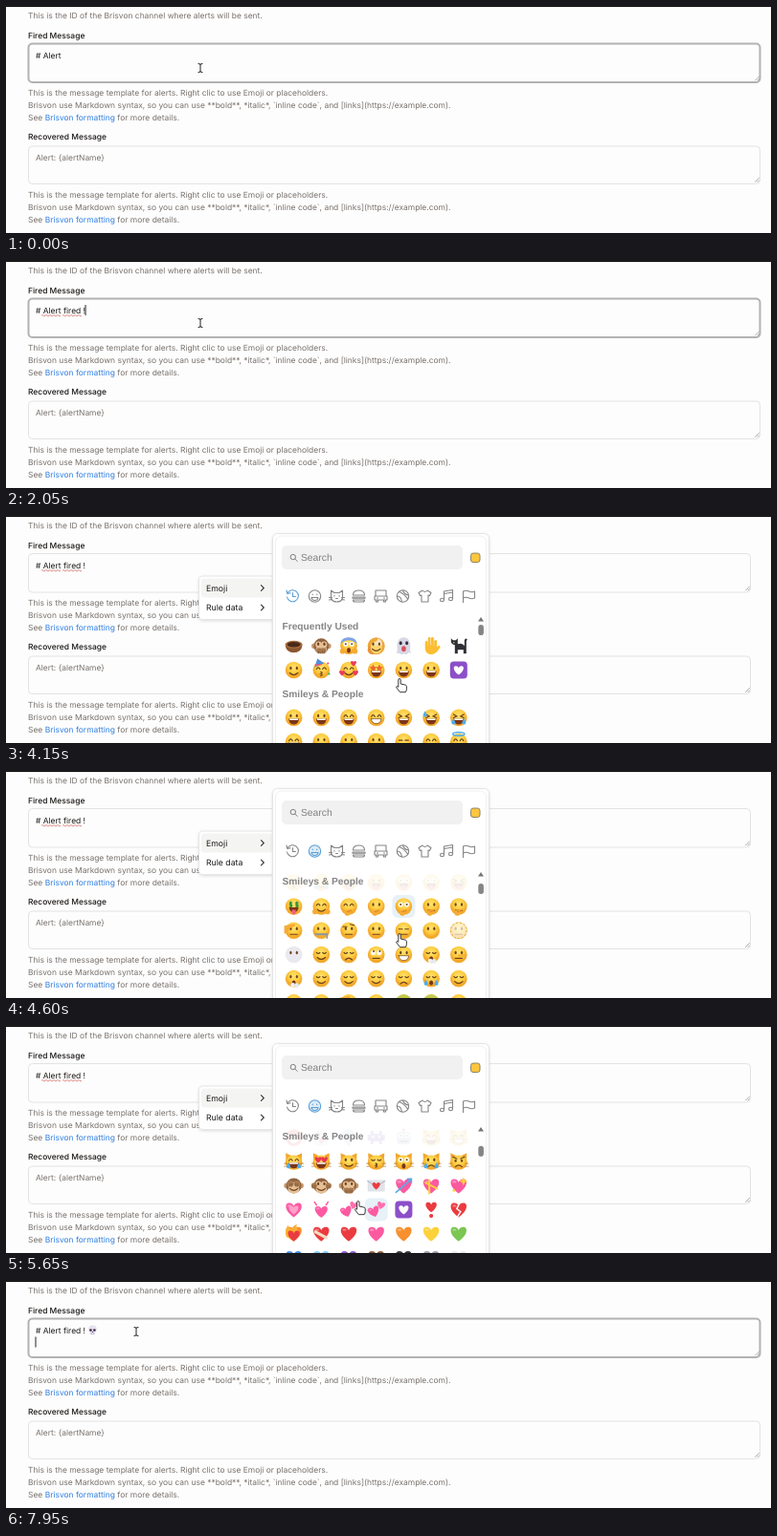
Write an HTML page that moves like this. It is 799 px wide and 238 px high and loops after 8000 ms.

```html
<!DOCTYPE html>
<html lang="en">
<head>
<meta charset="utf-8">
<title>Alert message form</title>
<style>
html, body { margin: 0; width: 100%; height: 100%; overflow: hidden; background: #fdfdfd; }
svg { display: block; width: 799px; height: 238px; }
text { font: 8.45px Inter, sans-serif; white-space: pre; text-rendering: geometricPrecision; }
.help { fill: #78716c; }
.label { font-weight: 500; fill: #1c1917; }
.field, .menu { fill: #1c1917; }
.menu { font-size: 8.7px; }
.link { fill: #2f7fe0; }
.search { font: 10.3px "Liberation Sans", sans-serif; fill: #808083; }
.heading { font: bold 10.2px "Liberation Sans", sans-serif; fill: #858587; }
.icon { fill: none; stroke: #858585; stroke-width: 1.1; stroke-linejoin: round; stroke-linecap: round; }
.icon.active { stroke: #5b9fd8; fill: #dcebf7; }
</style>
</head>
<body>
<svg id="stage" viewBox="0 0 799 238"></svg>
<script>
const LOOP = 8000;
const MENU_OPEN = 2700, PICKER_OPEN = 3080, PICK = 6350, MENU_CLOSE = 7050, ENTER = 7500;
const KEYS = [[300, ' '], [600, 'f'], [750, 'i'], [900, 'r'], [1050, 'e'], [1200, 'd'], [1500, ' '], [1850, '!']];
const POINTER = [[0, 203, 65], [2760, 203, 65], [3050, 228, 71], [3380, 228, 71], [3950, 411, 171], [5000, 411, 171],
  [5480, 395, 184], [5720, 361, 184], [6000, 356, 153], [6600, 356, 153], [7250, 136, 53]];
const SCROLL = [[4074, 0], [5400, 502.5], [5750, 502.5], [6050, 436]];
const COLUMN = 28.7, ROW = 25.2, FIRST_X = 300.6, FIRST_Y = 216.3;

const text = (x, y, cls, content) => `<text x="${x}" y="${y}" class="${cls}">${content}</text>`;
const rect = (x, y, w, h, r, attrs) => `<rect x="${x}" y="${y}" width="${w}" height="${h}" rx="${r}" ${attrs}/>`;
const circle = (x, y, r, fill, ry = r) => `<ellipse cx="${x}" cy="${y}" rx="${r}" ry="${ry}" fill="${fill}"/>`;
const fill = (d, color) => `<path d="${d}" fill="${color}"/>`;
const line = (d, color = '#6b431c', width = 1.2) =>
  `<path d="${d}" fill="none" stroke="${color}" stroke-width="${width}" stroke-linecap="round"/>`;
const at = (x, y, content, scale = 1, turn = 0) =>
  `<g transform="translate(${x} ${y}) rotate(${turn}) scale(${scale})">${content}</g>`;
const pair = draw => draw(-3.2) + draw(3.2);

// Emoji parts, drawn around 0,0 with a radius of 9
const HEART = 'M0 8C-10 1-10-7-4.6-7Q-1-7 0-3.5Q1-7 4.6-7C10-7 10 1 0 8z';
const COLORS = { P: '#fb5aa0', R: '#ea3c40', O: '#f7902f', Y: '#fdd13a', G: '#7cc653', B: '#438fe6', C: '#80cbf3',
  V: '#8b57c9', N: '#8c5b3d', K: '#35353a', S: '#9b9ba7', W: '#e9e9ef', E: '#c6c84c' };
const BROWN = '#6b431c', HAND = '#f6ab35';
const drop = (x, y) => fill(`M${x} ${y}q-4 6 0 6t0-6z`, '#49aef0');

const EYES = {
  o: pair(x => circle(x, -2, 1.1, BROWN, 1.7)),
  '^': line('M-5-1q1.8-3.4 3.6 0M1.4-1q1.8-3.4 3.6 0'),
  '-': line('M-5-2q1.8 2 3.6 0M1.4-2q1.8 2 3.6 0'),
  _: line('M-5-1.5h3.6M1.4-1.5h3.6'),
  x: line('M-5.4-3.5l3.4 2-3.4 1.6M5.4-3.5l-3.4 2 3.4 1.6'),
  w: pair(x => circle(x, -2, 2.5, '#fff') + circle(x, -2, 1, BROWN)),
  r: pair(x => circle(x, -2, 2.5, '#fff') + circle(x + .5, -3.4, 1, BROWN)),
  h: pair(x => at(x, -2, fill(HEART, '#e93750'), .42)),
  s: pair(x => fill(`M${x}-6l1.2 2.6 2.6.3-2 1.8.6 2.6-2.4-1.3-2.4 1.3.6-2.6-2-1.8 2.6-.3z`, '#e8682c')),
  b: pair(x => circle(x, -1, 1.1, BROWN, 1.5)) + line('M-6-5l4 2M6-5l-4 2'),
  g: fill('M-8-4h16q0 5-4 5t-4-4q0 4-4 4t-4-5z', '#2b2b2e'),
  $: pair(x => line(`M${x + 1.3}-4h-2.2v2h2v2h-2.2M${x}-5v6`, '#2f8f3d'))
};
const MOUTHS = {
  D: fill('M-5.5 1h11q-.6 6-5.5 6t-5.5-6z', '#7b3518') + fill('M-4.8 1h9.6l-.6 1.6h-8.4z', '#fff'),
  T: fill('M-5.2 1.2h10.4q-.4 5-5.2 5t-5.2-5z', '#fff') + line('M-5.2 1.2h10.4q-.4 5-5.2 5t-5.2-5z', BROWN, .7),
  P: fill('M-5 1h10q-.6 5-5 5t-5-5z', '#7b3518') + fill('M-2 3.5h4v4q-2 2-4 0z', '#f2607c'),
  ')': line('M-4.2 3q4.2 4 8.4 0'),
  '(': line('M-3.5 5.5q3.5-3.6 7 0'),
  '-': line('M-3.5 4h7'),
  '~': line('M-4 4q2-2.4 4 0t4 0'),
  O: circle(0, 4.5, 2, '#7b3518', 2.7),
  '*': line('M-.6 2q3 .6 0 2 3 .8 0 2'),
  n: ''
};
const EXTRAS = {
  t: drop(-5.5, 1) + drop(5.5, 1),
  w: drop(-6.5, -7),
  a: `<ellipse cy="-8" rx="6" ry="1.8" fill="none" stroke="#49aef0" stroke-width="1.6"/>`,
  r: [[-7, 3], [7, 3], [5, -7]].map(([x, y]) => at(x, y, fill(HEART, '#ec3a5b'), .36)).join(''),
  k: at(5, 5, fill(HEART, '#e93750'), .38),
  h: fill('M-4 9q-1-5 1-5l6-1.5q1.500 1-1 2.500q0 4-3 5z', HAND) + line('M-1.5 5.5l4-1', '#c9741f', .7),
  H: circle(-6.5, 5.5, 2.8, HAND) + circle(6.5, 5.5, 2.8, HAND),
  i: fill('M-8.800-2Q-8-9 0-9T8.800-2Q5-6 0-6T-8.800-2z', '#7da3e8'),
  s: fill('M-10-5l11-2 .5 2-6 3q-2 6-5.500 5z', HAND),
  z: line('M-6 4h12', '#8f979f', 2) + line('M6 4v4', '#8f979f', 1.6),
  m: fill('M-8 1Q0-1 8 1Q7 9 0 9T-8 1z', '#e8eef3'),
  b: line('M-6-4h4M1.5-6.5l4 1'),
  d: `<circle r="8.6" fill="#fff" opacity=".65"/><circle r="8.3" fill="none" stroke="#e3a52c" stroke-dasharray="2 2"/>`,
  f: circle(-1, 6.5, 2.2, '#eef2f6') + circle(3, 7, 2.4, '#e4eaf1'),
  l: line('M0 1h7', HAND, 2),
  c: fill('M-10-4q4 2 5-1q1-5 5-4t5 4q1 3 5 1q-3 5-10 4t-10-4z', '#98602f'),
  p: fill('M-7-3L-4-12 3-7z', '#4d8fe0') + line('M-6-5l6-1', '#f3547f', 1.5) + circle(7, -7, 1.1, '#ef4c73') + circle(8, 4, 1.2, '#53b95a')
};

function face([eyes, mouth, ...extras]) {
  const color = extras.map(e => COLORS[e]).find(Boolean) || 'url(#sun)';
  return circle(0, 0, 8.8, color) + EYES[eyes] + MOUTHS[mouth] + extras.map(e => EXTRAS[e] || '').join('');
}

const HEART_EXTRAS = {
  a: line('M-8 7L8-7M4-7h4v4', '#5aa9e8', 1.6),
  r: line('M-6-3L6 3M-2 8V-6', '#fdd13a', 2),
  s: fill('M5-9l1.3 3 3 1.3-3 1.3L5 0 3.7-3.4.7-4.7l3-1.3z', '#fdd13a') + circle(-5, 5, 1.4, '#fdd13a'),
  i: at(0, 0, fill(HEART, '#ff9fca'), .6),
  f: fill('M-8 3q-2-6 2-12q1 4 3 4q2-3 6-5q-1 4 3 8l-6 10z', '#fbb034') + at(0, 2, fill(HEART, '#ea3c40'), .75),
  b: line('M-6-2L5 4', '#f4dcc0', 3.2),
  x: line('M0-5l-2 4 4 3-3 5', '#fdfdfd', 1.4)
};
const heart = ([color, ...extras]) => fill(HEART, COLORS[color]) +
  `<ellipse cx="-4.500" cy="-4" rx="2.200" ry="1.300" fill="#fff" opacity=".3"/>` + extras.map(e => HEART_EXTRAS[e]).join('');

const skull = fill('M-8-1Q-8-9 0-9T8-1Q8 3 5 4V8H-5V4Q-8 3-8-1z', '#e6dff0') +
  pair(x => circle(x * 1.1, 0, 2.4, '#3b2a45')) + fill('M0 2l1.3 2.5h-2.6z', '#3b2a45') + line('M-2 6v2M2 6v2', '#8d7d99', .9);
const catHead = (color, ears) => fill('M-8 1L-8.5-9-2-6H2L8.5-9 8 1z', ears) + circle(0, 1, 9, color, 7.6);
const THINGS = {
  c: look => catHead('url(#sun)', '#f2a62b') + EYES[look[0]] + MOUTHS[look[1]] + line('M-10 2h3M-10 5h3M10 2h-3M10 5h-3', '#9c6a2a', .6) + (look[2] ? EXTRAS.t : ''),
  m: hands => {
    const [dx, y] = { e: [3.2, -2], h: [7.5, 0], m: [2, 5] }[hands];
    return circle(-7.5, 0, 2.8, '#c79a6c') + circle(7.5, 0, 2.8, '#c79a6c') + circle(0, 0, 8, '#916543') +
      pair(x => circle(x * .9, -1.5, 3.2, '#e7c097')) + circle(0, 3.8, 5.8, '#e7c097', 4.2) + EYES.o + MOUTHS[')'] +
      [-dx, dx].map(x => circle(x, y, 3, '#a87a50') + line(`M${x - 1}${y < 0 ? '' : ' '}${y}v2.500m2-2.500v2.500`, '#74502f', .6)).join('');
  },
  k: () => skull,
  b: () => at(0, -2, skull, .75) + line('M-7 8L7 3M7 8L-7 3', '#d9d0e2', 2),
  p: () => fill('M0-9q4 3 3 5q4 1 2 4q4 1 4 5q0 4-5 4h-8q-5 0-5-4t4-5q-2-3 2-4z', '#81533a') + EYES.w + MOUTHS[')'],
  j: () => circle(-7, -4, 4, '#ee5144') + circle(7, -4, 4, '#ee5144') + circle(0, 0, 8, '#f5e9dc') + EYES.o + circle(0, 1, 2, '#e93a3a') + MOUTHS[')'],
  o: () => circle(0, 0, 8.5, '#d6402f') + line('M-5-7l-2-3M5-7l2-3', '#f2d16c', 2) + EYES.b + MOUTHS.T,
  g: () => fill('M-8 8q2-3 1-9Q-6-9 0-9T7-1q-1 6 1 9q-3-2-4 0q-2 2-4 0q-2 2-4 0q-2-1-4 0z', '#d9d7e4') +
    pair(x => circle(x, -3, 1.5, '#34313c', 2)) + circle(0, 3, 2.3, '#d8505e', 3),
  a: () => fill('M-7-2Q-7-9 0-9T7-2Q6 4 0 9Q-6 4-7-2z', '#b3bac2') + pair(x => circle(x, 0, 2, '#303338', 2.6)),
  i: () => fill('M-6-7h3v3h6v-3h3v4h3v6h-3v4h-3v-3h-6v3h-3v-4h-3v-6h3z', '#7d55c5') + pair(x => circle(x, -1, 1.3, '#fff')),
  r: () => rect(-7, -6, 14, 13, 3, 'fill="#a5b2be"') + circle(0, -8, 1.5, '#ea4a4a') + EYES.w + line('M-3 4h6', '#4d5966', 2),
  l: () => rect(-9, -6, 18, 12, 1, 'fill="#dfe4ea"') + line('M-9-5l9 6 9-6', '#b6bec8') + at(0, 0, fill(HEART, '#ea3c40'), .5),
  q: () => rect(-9, -9, 18, 18, 4, 'fill="#8d4fc8"') + at(0, 0, fill(HEART, '#fff'), .62),
  e: () => at(0, -3, fill(HEART, '#ea3c40'), .7) + circle(0, 6.5, 2.1, '#ea3c40'),
  d: () => at(-2.5, 2, heart('P'), .72, -18) + at(5, -4.5, fill(HEART, '#ff6fae'), .5, 15),
  v: () => at(0, 2, heart('P'), .8) + line('M-7-8l2 3M7-8l-2 3', '#fb5aa0', 1.6),
  n: () => fill('M-9-1Q-8 7 0 7T9-1z', '#8a5630') + circle(0, -1.5, 9, '#a56c40', 4) + circle(0, -1.5, 7, '#4b2a18', 2.8),
  w: () => circle(0, 0, 9, '#f0a63a') + circle(-4, 4, 5, '#e9923a') + circle(0, 1.5, 6, '#fbd66d', 6.5) + fill('M-6-1Q0-3 2-8q5 2 4 8z', '#f7e4bd') + EYES.o + MOUTHS[')'],
  h: () => line('M-5 3v-7M-2 1v-9M1.3 1v-9M4.5 2v-7M5 5l3-4', '#fdbd30', 2.8) + circle(0, 4, 6, '#fdbd30', 5),
  z: () => fill('M-8-8l2 2h3l2-2 0 6q5-2 7 2l0-6q1-3 3-1l-1 2v13h-3v-4h-6v4h-3v-9q-4-1-4-4z', '#2f2f35') + circle(-5, -3.5, .8, '#f6c335')
};

const emoji = token => token[0] === '@' ? THINGS[token[1]](token.slice(2)) : token[0] === '&' ? heart(token.slice(1)) : face(token);
const FREQUENT = ['@n @mm wOiH @w @g @h @z', 'o) ^*p ^)r sD oD oD @q'];
const SMILEYS = [
  'oD oD ^D ^T xD xDw xDt', '^Dt o) o( o) _) ^) ^)a', '^)r hD sD o*k o* ^) ^*', '^* o)t ^P oP wP wP xP',
  '$P ^)H ^nh onh wnh o-h o-h', 'o-s o-z o-b o- _- on o-d', 'onW -) -( r- oT -Of o-l', 'oOf -) -) -) -( -Ot -)',
  '_O onm -(s -(m -~E xOE xnm', '-OwO oTC w~ xO xO wO oDc', '^*p w- g) wT w( o( o~', 'o( o( o( oO oO wO w-',
  'w( w) oO oO wO oOw o(w', 'o(t -Ot wOiH x~ x( -( -(w', 'xO xO -Oh x(f b(R b( b-R', 'b)V b(V @k @b @p @j @o',
  'bTR @g @a @i @r @c^D @c^T', '@c^Dt @chD @co) @c-* @cwO @co(t @cb(', '@me @mh @mm @l &Pa &Pr &Ps', '&Pi @v @d @d @q @e &Rx',
  '&Of &Rb &R &P &O &Y &G', '&B &C &V &N &K &S &W'
];
const grid = (rows, top) => rows.map((row, r) => row.split(' ')
  .map((token, c) => at(FIRST_X + c * COLUMN, top + r * ROW, emoji(token))).join('')).join('');

const ICONS = [
  'M-5.5-3A6 6 0 1 1-6 1M-6.5-6l.8 3.4 3.3-.6M0-3.5V.5H3',
  'M6.2 0A6.2 6.2 0 1 1-6.2 0A6.2 6.2 0 1 1 6.2 0M-2.3-2v.6M2.3-2v.6M-3.5 1.5h7q-.5 3-3.5 3t-3.5-3z',
  'M-6 2V-6l3.5 2.5h5L6-6v8q-1 4-6 4t-6-4zM-2.5-.5v.6M2.5-.5v.6M-1 2.5h2M-8 1.5h3M-8 4l3-.6M8 1.5H5M8 4l-3-.6',
  'M-6-1q0-5 6-5t6 5zM-6.5 1h13v1.2h-13zM-6 4h12q0 2-2 2h-8q-2 0-2-2z',
  'M-5.5-6h11V0h-11zM-6.5 0h13v4h-13zM-5 4v2h2V4M5 4v2H3V4M-4 2h1M3 2h1',
  'M6.2 0A6.2 6.2 0 1 1-6.2 0A6.2 6.2 0 1 1 6.2 0M-4-4.5Q1-3 5 3M0-6Q1-2 6-1M-6 0Q-2 0-1 6',
  'M-2.5-6q2.5 3 5 0L6.5-3.5 5-.5 3.5-1V6h-7V-1L-5-.5-6.5-3.5z',
  'M-3 4V-5L6-6.5V3M-3-2.5L6-4M-3 4a2 1.7 0 1 1-4 0a2 1.7 0 1 1 4 0M6 3a2 1.7 0 1 1-4 0a2 1.7 0 1 1 4 0',
  'M-6 6.5V-5q3-1.5 6 0t6 0V2q-3 1.5-6 0t-6 0'
];
const POINTERS = {
  beam: line('M-2-4.5q2 0 2 1q0-1 2-1M0-4v8M-2 4.5q2 0 2-1q0 1 2 1', '#222', 1),
  arrow: `<path d="M0 0V10.5L2.5 8.3 4.2 12 6 11.2 4.4 7.7H7.8z" fill="#fff" stroke="#222" stroke-width=".9"/>`,
  hand: `<path d="M-1.2 7V.8Q-1.2-.4 0-.4T1.2.8V5l5.2 1.2q1 .3 1 1.5v2.5q0 1.8-1 3.5H.5l-4-5.2q0-1.600 2.300-.3z" fill="#fff" stroke="#222" stroke-width=".9"/>`
};

const help = y => text(23, y, 'help', 'This is the message template for alerts. Right clic to use Emoji or placeholders.') +
  text(23, y + 12.7, 'help', 'Brisvon use Markdown syntax, so you can use **bold**, *italic*, `inline code`, and [links](https://example.com).') +
  text(23, y + 25.4, 'help', 'See <tspan class="link">Brisvon formatting</tspan> for more details.');
const grip = y => line(`M-5 ${y}l4-4M-2.5 ${y}l1.5-1.5`, '#8a8a8a', .7);
const menuItem = (y, label) => text(209, y, 'menu', label) + line(`M266.5 ${y - 5.8}l2.8 2.8-2.8 2.8`, '#333', 1.1);
const squiggle = (id, x) => `<path id="${id}" fill="none" stroke="#d8706a" stroke-width=".8" d="M${x} 57.3${'q1-1.600 2 0t2 0'.repeat(5)}"/>`;

stage.innerHTML = `
<defs>
  <radialGradient id="sun" cy=".35"><stop offset="0" stop-color="#ffe270"/><stop offset=".65" stop-color="#fdcc40"/><stop offset="1" stop-color="#f3a92c"/></radialGradient>
  <filter id="shadow" x="-10%" y="-20%" width="120%" height="150%"><feDropShadow dx="0" dy="1.2" stdDeviation="1.8" flood-opacity=".12"/></filter>
  <clipPath id="list"><rect x="285" y="103" width="206" height="135"/></clipPath>
</defs>
${rect(0, 0, 799, 238, 0, 'fill="#fdfdfd"')}${rect(0, 0, 799, 1, 0, 'fill="#1b1a16"')}
${text(23, 12.5, 'help', 'This is the ID of the Brisvon channel where alerts will be sent.')}
${text(23, 33.5, 'label', 'Fired Message')}${text(23, 140.3, 'label', 'Recovered Message')}
${help(94.3)}${help(201.3)}
${rect(23.5, 39.5, 764, 40.5, 4, 'id="firedBox" fill="#fdfdfd"')}
${rect(23.5, 147, 764, 39.5, 4, 'id="recoveredBox" fill="#fdfdfd" stroke="#e3e3e3"')}
<g id="grips">${grip(78)}${grip(184.5)}</g>
${text(31, 161.7, 'help', 'Alert: {alertName}')}
<text id="message" x="31" y="54.8" class="field"></text>
${squiggle('spellAlert', 37)}${squiggle('spellFired', 59)}
<g id="picked">${at(5, 51.5, skull, .55)}</g>
<rect id="caret" width="1" height="11" fill="#222"/>
<g id="menu">
  ${rect(201.5, 63, 79, 45.5, 4, 'fill="#fff" stroke="#e6e6e6" filter="url(#shadow)"')}
  ${rect(204, 65.5, 74, 20, 3, 'id="itemHover" fill="#f4f4f3"')}
  ${menuItem(78.5, 'Emoji')}${menuItem(99, 'Rule data')}
</g>
<g id="picker">
  ${rect(278.5, 18.5, 226, 240, 5, 'fill="#fff" stroke="#e4e4e4" filter="url(#shadow)"')}
  ${rect(281.5, 21, 220, 240, 6, 'fill="#fff" stroke="#f0f0f0"')}
  ${rect(288, 31, 189, 25, 5, 'fill="#f1f1f2"')}
  ${line('M301.8 45l2.4 2.4', '#808083', 1)}<circle cx="299.8" cy="43" r="2.7" fill="none" stroke="#808083"/>
  ${text(308, 46.8, 'search', 'Search')}
  ${rect(485.5, 39, 9.5, 9.5, 2.5, 'fill="#fdc63f" stroke="#8d8468"')}
  ${ICONS.map((d, i) => `<path class="icon" d="${d}" transform="translate(${299.5 + i * 23} 84)"/>`).join('')}
  <g clip-path="url(#list)">
    <g id="content">
      ${rect(-12, -12, 24, 24, 6, 'id="cellHover" fill="#e6f1f8"')}
      ${grid(FREQUENT, 141.2)}${grid(SMILEYS, FIRST_Y)}
    </g>
    <g id="frequentHead">${rect(285, 103, 206, 24, 0, 'fill="#fff" opacity=".9"')}${text(288.5, 118.8, 'heading', 'Frequently Used')}</g>
    <g id="smileysHead">${rect(285, 103, 206, 24, 0, 'fill="#fff" opacity=".9"')}${text(288.5, 118.8, 'heading', 'Smileys &amp; People')}</g>
  </g>
  ${fill('M493 110.5l3-4.5 3 4.5z', '#77777a')}
  ${rect(493.3, 114, 5.6, 11, 2.8, 'id="thumb" fill="#858585"')}
</g>
<g id="pointer">${Object.entries(POINTERS).map(([name, art]) => `<g id="${name}">${art}</g>`).join('')}</g>`;

const $ = id => document.getElementById(id);
const show = (id, on) => $(id).setAttribute('visibility', on ? 'inherit' : 'hidden');
const move = (id, x, y) => $(id).setAttribute('transform', `translate(${x} ${y})`);
const set = (id, attrs) => Object.entries(attrs).forEach(([name, value]) => $(id).setAttribute(name, value));
const fade = (t, from, to) => Math.max(0, Math.min(1, (t - from) / 100, (to - t) / 100));
const icons = document.querySelectorAll('.icon');

// Values of the eased keyframe list at time t
function track(keys, t) {
  const next = keys.findIndex(key => key[0] > t);
  if (next < 1) return (next ? keys[keys.length - 1] : keys[0]).slice(1);
  const a = keys[next - 1], b = keys[next], p = (t - a[0]) / (b[0] - a[0]), eased = p * p * (3 - 2 * p);
  return a.slice(1).map((value, i) => value + (b[i + 1] - value) * eased);
}

function drawField(t) {
  const focused = t < MENU_OPEN || t >= PICK, picked = t >= PICK, entered = t >= ENTER;
  const right = t >= MENU_OPEN && t < MENU_CLOSE ? 777.5 : 787.5;
  set('firedBox', { width: right - 23.5, stroke: focused ? '#b2b2b2' : '#e3e3e3', 'stroke-width': focused ? 2 : 1 });
  set('recoveredBox', { width: right - 23.5 });
  move('grips', right, 0);

  const typed = KEYS.filter(([time]) => time <= t);
  $('message').textContent = '# Alert' + typed.map(([, key]) => key).join('') + (picked ? ' ' : '');
  show('spellAlert', typed.length > 0 && !picked);
  show('spellFired', typed.length > 6 && !picked);
  show('picked', picked);
  const end = 31 + $('message').getComputedTextLength();
  move('picked', end, 0);

  const lastKey = entered ? ENTER : picked ? PICK : typed.length ? typed[typed.length - 1][0] : -600;
  show('caret', focused && Math.floor((t - lastKey) / 530) % 2 === 0);
  set('caret', { x: entered ? 30.5 : picked ? end + 12 : end - .5, y: entered ? 58.5 : 46 });
}

function drawPopups(t) {
  $('menu').style.opacity = fade(t, MENU_OPEN, MENU_CLOSE);
  show('itemHover', t > 2950 && t < PICK);
  $('picker').style.opacity = fade(t, PICKER_OPEN, PICK);

  const [scroll] = track(SCROLL, t);
  move('content', 0, -scroll);
  move('smileysHead', 0, Math.max(0, 76 - scroll));
  move('frequentHead', 0, Math.min(0, 52 - scroll));
  move('thumb', 0, scroll * .0235);
  icons.forEach((icon, i) => icon.classList.toggle('active', i === (scroll > 60 ? 1 : 0)));
  icons[0].style.fill = 'none';

  // The hover mark trails the pointer slightly
  const [x, y] = track(POINTER, t - 50), [oldScroll] = track(SCROLL, t - 50);
  const column = Math.round((x - FIRST_X) / COLUMN), row = Math.round((y + oldScroll - FIRST_Y) / ROW);
  show('cellHover', column >= 0 && row >= 0 && y > 127);
  move('cellHover', FIRST_X + column * COLUMN, FIRST_Y + row * ROW);
}

function drawPointer(t) {
  const [x, y] = track(POINTER, t);
  const menuOpen = t >= MENU_OPEN && t < MENU_CLOSE;
  const overPicker = t >= PICKER_OPEN && t < PICK && x > 286 && y > 127;
  const overField = !menuOpen && (y > 39 && y < 80 || y > 147 && y < 187);
  const kind = overPicker ? 'hand' : overField ? 'beam' : 'arrow';
  Object.keys(POINTERS).forEach(name => show(name, name === kind));
  move('pointer', x, y);
}

function frame(now) {
  const t = now % LOOP;
  drawField(t);
  drawPopups(t);
  drawPointer(t);
  requestAnimationFrame(frame);
}
requestAnimationFrame(frame);
</script>
</body>
</html>
```
